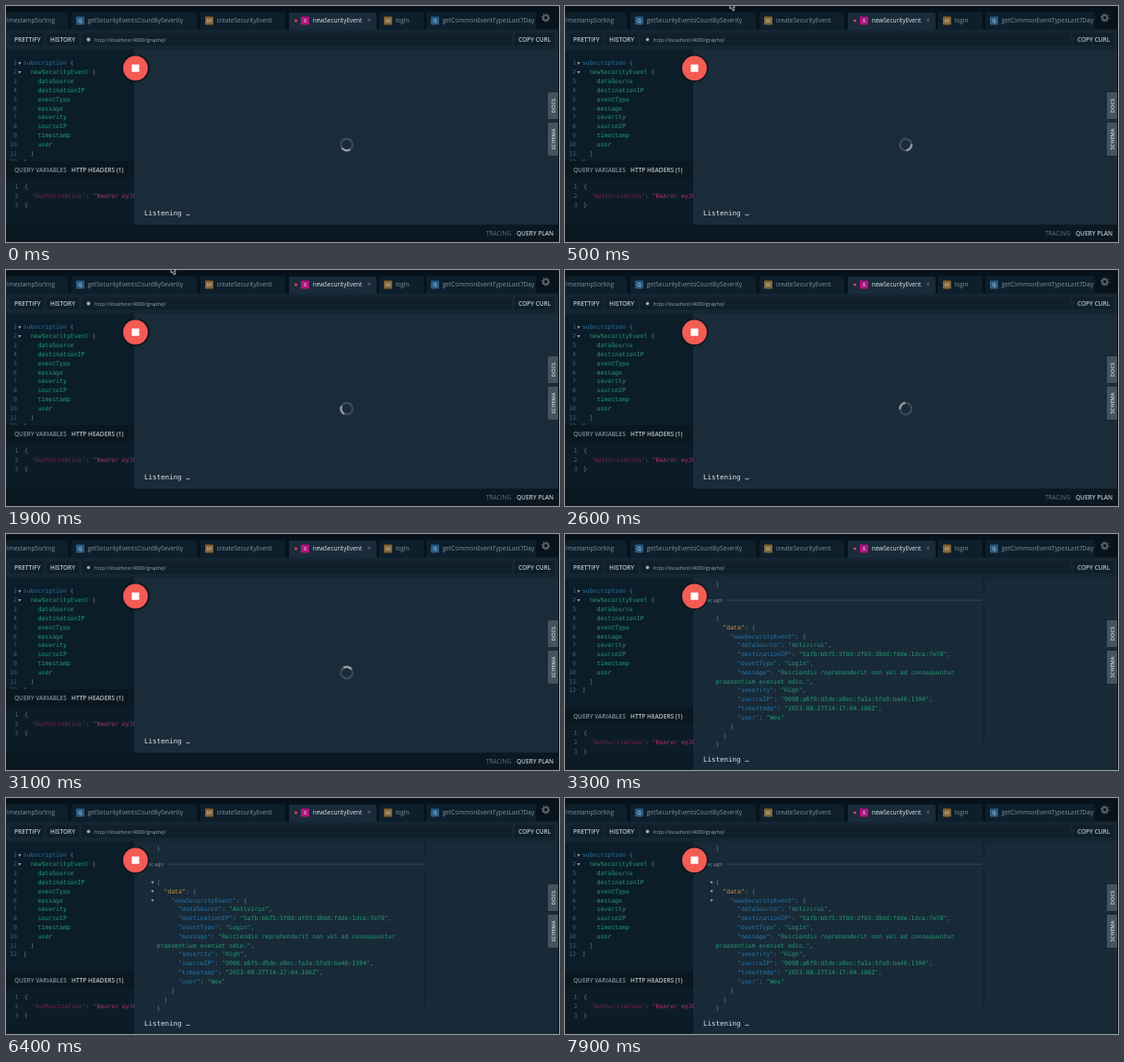
Animation of 600 by 257 pixels, one loop 8000 ms. Source, as an HTML page:

```html
<!DOCTYPE html>
<html lang="en">
<head>
<meta charset="utf-8">
<title>Subscription playground</title>
<style>
  html, body { margin: 0; width: 100%; height: 100%; overflow: hidden; background: #08121a; }
  svg { display: block; width: 100%; height: 100%; }
  text { white-space: pre; font: 6.5px "Open Sans", sans-serif; }
  .mono { font: 6.52px "DejaVu Sans Mono", monospace; }
  .status { font: 7.5px "DejaVu Sans Mono", monospace; }
  .bold { font-weight: 600; }
  .small { font-size: 5.65px; }
  .badge { font-size: 5.6px; font-weight: 700; text-anchor: middle; }
  .end { text-anchor: end; }
</style>
</head>
<body>
<svg id="stage" viewBox="0 0 600 257" preserveAspectRatio="none"></svg>
<script>
const LOOP = 8000, RESULT_AT = 3300, SPIN_END = 2700, SPIN_PERIOD = 600;
const PULSE_STARTS = [-300, 1700, 3200, 5700, 7800], PULSE_LENGTH = 750;
const ROW = 9.82, INDENT = 7.85;
const C = {
  panel: '#1a2b3a', bar: '#152633', field: '#0f202c', editor: '#0b1d28', tab: '#0e1f2c',
  dim: '#82909a', light: '#bdc5ca', white: '#e2e6e8', gutter: '#4d6068', brace: '#6b7c82',
  blue: '#2675a9', green: '#259a73', orange: '#d3913a', key: '#7d204c', value: '#ab3068'
};

const stage = document.getElementById('stage');
const rect = (x, y, w, h, fill, extra = '') =>
  `<rect x="${x}" y="${y}" width="${w}" height="${h}" fill="${fill}" ${extra}/>`;
const text = (x, y, content, fill, cls = '', extra = '') =>
  `<text x="${x}" y="${y}" fill="${fill}" class="${cls}" ${extra}>${content}</text>`;
const span = (content, fill) => `<tspan fill="${fill}">${content}</tspan>`;
const mono = (x, y, content, fill = C.brace) => text(x, y + 2.1, content, fill, 'mono');
const caret = (x, y) => `<path d="M${x - 1.7} ${y - 1}h3.4l-1.7 2.6z" fill="#9aa8ae"/>`;

function tab(x, w, letter, color, label, active = false) {
  const shift = active ? 13 : 5;
  const dot = active ? `<circle cx="${x + 7.5}" cy="16" r="1.6" fill="#df4056"/>` +
    text(x + 85, 18.3, '×', C.dim) : '';
  return rect(x, 7, w, 19, active ? C.panel : C.tab, 'rx="1.5"') + dot +
    `<g opacity="${active ? 1 : .85}">` + rect(x + shift, 11.5, 9, 9, color, 'rx="1"') +
    text(x + shift + 4.5, 18, letter, C.light, 'badge') + '</g>' +
    text(x + shift + 12.7, 18.3, label, active ? C.white : C.dim);
}

function header() {
  return rect(0, 0, 600, 26, '#08121a') + rect(0, 25.5, 600, 22.2, C.bar) +
    rect(-5, 7, 72, 19, C.tab) + text(53, 18.3, 'TimestampSorting', C.dim, 'end') +
    tab(71, 136, 'Q', '#2a6697', 'getSecurityEventsCountBySeverity') +
    tab(211, 92, 'M', '#9b7030', 'createSecurityEvent') +
    tab(307, 95, 'S', '#b3137f', 'newSecurityEvent', true) +
    tab(405, 48, 'M', '#9b7030', 'login') +
    tab(456, 119, 'Q', '#2a6697', 'getCommonEventTypesLast7Day') +
    `<g fill="none" stroke="#53626c"><circle cx="585.7" cy="12.8" r="2.7" stroke-width="1.8"/>
     <circle cx="585.7" cy="12.8" r="4.1" stroke-width="1.4" pathLength="16" stroke-dasharray="1 1"/></g>` +
    rect(5, 29.5, 36, 13.5, C.field, 'rx="1"') + rect(44, 29.5, 35, 13.5, C.field, 'rx="1"') +
    rect(82, 29.5, 467, 13.5, C.field, 'rx="1"') + rect(552, 29.5, 43, 13.5, C.field, 'rx="1"') +
    text(9, 38.7, 'PRETTIFY', C.light, 'bold') + text(48, 38.7, 'HISTORY', C.light, 'bold') +
    text(556, 38.7, 'COPY CURL', C.light, 'bold') +
    text(96, 38.6, 'http://localhost:4000/graphql', '#9aa6ae', 'small') +
    `<circle id="halo" cx="89.5" cy="36.5" fill="#dce4e8"/>
     <circle cx="89.5" cy="36.5" r="1.7" fill="#a5afb5"/>
     <path id="cursor" d="M179-2v5l1.6-1.2 1.7 3.4 1.6-.8-1.6-3.2 2-.2-3-3z" fill="#000" stroke="#eee" stroke-width=".8"/>`;
}

function editor() {
  const fields = ['dataSource', 'destinationIP', 'eventType', 'message', 'severity', 'sourceIP', 'timestamp', 'user'];
  const lines = [
    [0, span('subscription', C.blue) + ' {'],
    [1, span('newSecurityEvent', C.green) + ' {'],
    ...fields.map(name => [2, span(name, C.green)]),
    [1, '}'], [0, '}']
  ];
  return rect(0, 47, 140, 210, C.editor) + lines.map(([depth, content], i) => {
    const y = 62.3 + i * ROW;
    return text(12, y + 2.1, i + 1, C.gutter, 'mono end') + mono(18.8 + depth * INDENT, y, content);
  }).join('') + caret(14.8, 62.3) + caret(14.8, 72.1);
}

function variables() {
  const lines = ['{', '  ' + span('"Authorization"', C.key) + ': ' + span('"Bearer eyJhbGci', C.value), '}'];
  return rect(0, 169, 140, 90, '#0a1720') + rect(0, 187, 140, 72, '#0c1c27') +
    text(9, 180.8, 'QUERY VARIABLES', C.dim, 'bold') + text(71, 180.8, 'HTTP HEADERS (1)', C.light, 'bold') +
    lines.map((content, i) => {
      const y = 197.3 + i * ROW;
      return text(13.5, y + 2.1, i + 1, C.gutter, 'mono end') + mono(20, y, content);
    }).join('');
}

function response() {
  const pair = (key, value) => [3, span(`"${key}"`, C.blue) + ': ' + span(`"${value}"`, C.green) + (key === 'user' ? '' : ',')];
  const lines = [
    [0, '{'],
    [1, span('"data"', C.orange) + ': {'],
    [2, span('"newSecurityEvent"', C.blue) + ': {'],
    pair('dataSource', 'Antivirus'),
    pair('destinationIP', '5a7b:bb75:5f0d:df03:38dd:fdde:1dca:7e70'),
    pair('eventType', 'Login'),
    [3, span('"message"', C.blue) + ': ' + span('"Reiciendis reprehenderit non vel ad consequuntur', C.green)],
    [0, span('praesentium eveniet odio."', C.green) + ','],
    pair('severity', 'High'),
    pair('sourceIP', '9008:a6f5:d5de:a9ec:fa3a:5fa9:ba46:1394'),
    pair('timestamp', '2023-08-27T14:17:04.106Z'),
    pair('user', 'Wex'),
    [2, '}'], [1, '}'], [0, '}']
  ];
  return rect(139, 47, 461, 210, '#182a38') +
    rect(453, 47, 2.5, 18, '#132330') + rect(453, 78, 2.5, 147, '#132330') +
    mono(171.4, 45.3, '}') + mono(163.5, 55.1, '}') +
    text(171, 74.2, '3 sec ago', C.dim, 'small end') + rect(175, 71.7, 278, .8, '#3b4b57') +
    lines.map(([depth, content], i) => mono(163.5 + depth * INDENT, 91.8 + i * ROW, content)).join('') +
    `<g id="folds">${[0, 1, 2].map(i => caret(159, 91.8 + i * ROW)).join('')}</g>`;
}

function sideTab(y, h, label) {
  return rect(588, y, 11, h, '#435460', 'rx="1"') +
    text(0, 0, label, '#d3d9dc', 'small bold', `text-anchor="middle" transform="translate(595.6 ${y + h / 2}) rotate(-90)"`);
}

stage.innerHTML = editor() + `<g class="lower">${variables()}</g>` +
  rect(139, 47, 461, 210, C.panel) +
  `<g id="spinner" fill="none" stroke="#fff" stroke-width="2.4">
     <circle r="6.3" stroke-opacity=".15"/>
     <path d="M-4.45-4.45A6.3 6.3 0 0 1 4.45-4.45" stroke-opacity=".45"/>
   </g>
   <g id="response">${response()}</g>
   <g class="lower">${text(150, 228, 'Listening …', C.white, 'status')}${rect(0, 238, 600, 20, '#0b1822')}
     ${text(521, 249.7, 'TRACING', '#66747d')}${text(554, 249.7, 'QUERY PLAN', C.light, 'bold')}</g>` +
  sideTab(94, 29, 'DOCS') + sideTab(127, 36, 'SCHEMA') + header() +
  rect(599, 0, 1, 257, '#060c11') +
  `<circle cx="140.5" cy="67.7" r="15" fill="#0b161e"/>
   <circle cx="140.5" cy="67.7" r="13.4" fill="#f25c54"/>` + rect(136.5, 63.7, 8, 8, '#fff');

const part = id => document.getElementById(id);
const [spinner, responseView, folds, halo, cursor] = ['spinner', 'response', 'folds', 'halo', 'cursor'].map(part);
const lowerParts = document.querySelectorAll('.lower');
const show = (el, visible) => el.setAttribute('visibility', visible ? 'inherit' : 'hidden');

function render(t) {
  const received = t >= RESULT_AT;
  const angle = 190 + Math.min(t, SPIN_END) / SPIN_PERIOD * 360;
  spinner.setAttribute('transform', `translate(369.7 151) rotate(${angle})`);
  show(responseView, received);
  show(folds, t >= 3800);
  show(cursor, t >= 500 && t < 2000);
  lowerParts.forEach(el => el.setAttribute('transform', `translate(0 ${received ? 20 : 0})`));

  const start = PULSE_STARTS.findLast(s => s <= t);
  const phase = Math.min((t - start) / PULSE_LENGTH, 1);
  halo.setAttribute('r', 1.7 + 2 * phase);
  halo.setAttribute('opacity', .45 * (1 - phase));
}

const began = performance.now();
function frame() {
  const elapsed = (performance.now() - began) % LOOP;
  render(Math.floor(elapsed / 100) * 100);
  requestAnimationFrame(frame);
}
frame();
</script>
</body>
</html>
```
